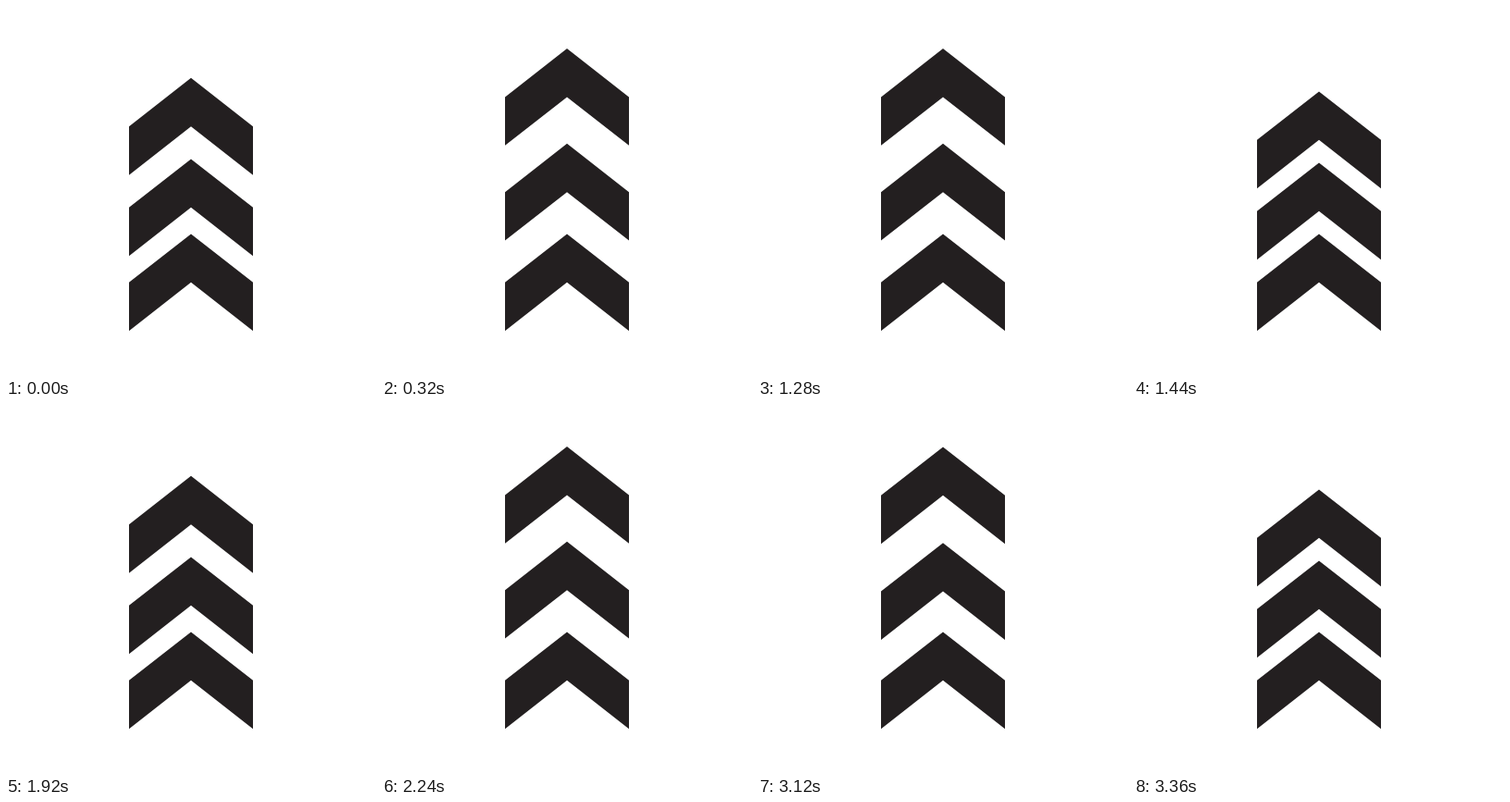
These frames come from a looping animation (400x400 px, 3.84 s). An HTML page:

```html
<!DOCTYPE html>
<html lang="en">
<head>
<meta charset="utf-8">
<title>Rising chevrons</title>
<style>
html, body { margin: 0; width: 100%; height: 100%; overflow: hidden; background: #fff; }
svg { display: block; width: 100vw; height: 100vh; }
</style>
</head>
<body>
<svg viewBox="0 0 400 400" fill="#231f20">
  <defs><path id="chevron" d="M200 0L267 52.4V104.8L200 52.4L133 104.8V52.4Z"/></defs>
  <use href="#chevron" y="92.4"/>
  <use href="#chevron" y="169.4"/>
  <use href="#chevron" y="246.4"/>
</svg>
<script>
const STEP = 40, CYCLE = 24, RISE = 9, FALL = 4;
const movers = [
  { rest: 92.4, lift: 46.4, power: 3.2 },
  { rest: 169.4, lift: 20.6, power: 1.8 }
];
const chevrons = document.querySelectorAll('use');

// Fraction of the full lift: decelerating rise, smooth drop, then rest.
function liftAt(step, power) {
  if (step <= RISE) return 1 - (1 - step / RISE) ** power;
  const drop = Math.min(1, (step - RISE) / FALL);
  return (1 + Math.cos(Math.PI * drop)) / 2;
}

function draw(now) {
  const step = Math.floor(now / STEP) % CYCLE + 1;
  movers.forEach(({ rest, lift, power }, i) => {
    chevrons[i].setAttribute('y', rest - lift * liftAt(step, power));
  });
}

const start = performance.now();
function tick() {
  draw(performance.now() - start);
  requestAnimationFrame(tick);
}
tick();
</script>
</body>
</html>
```
